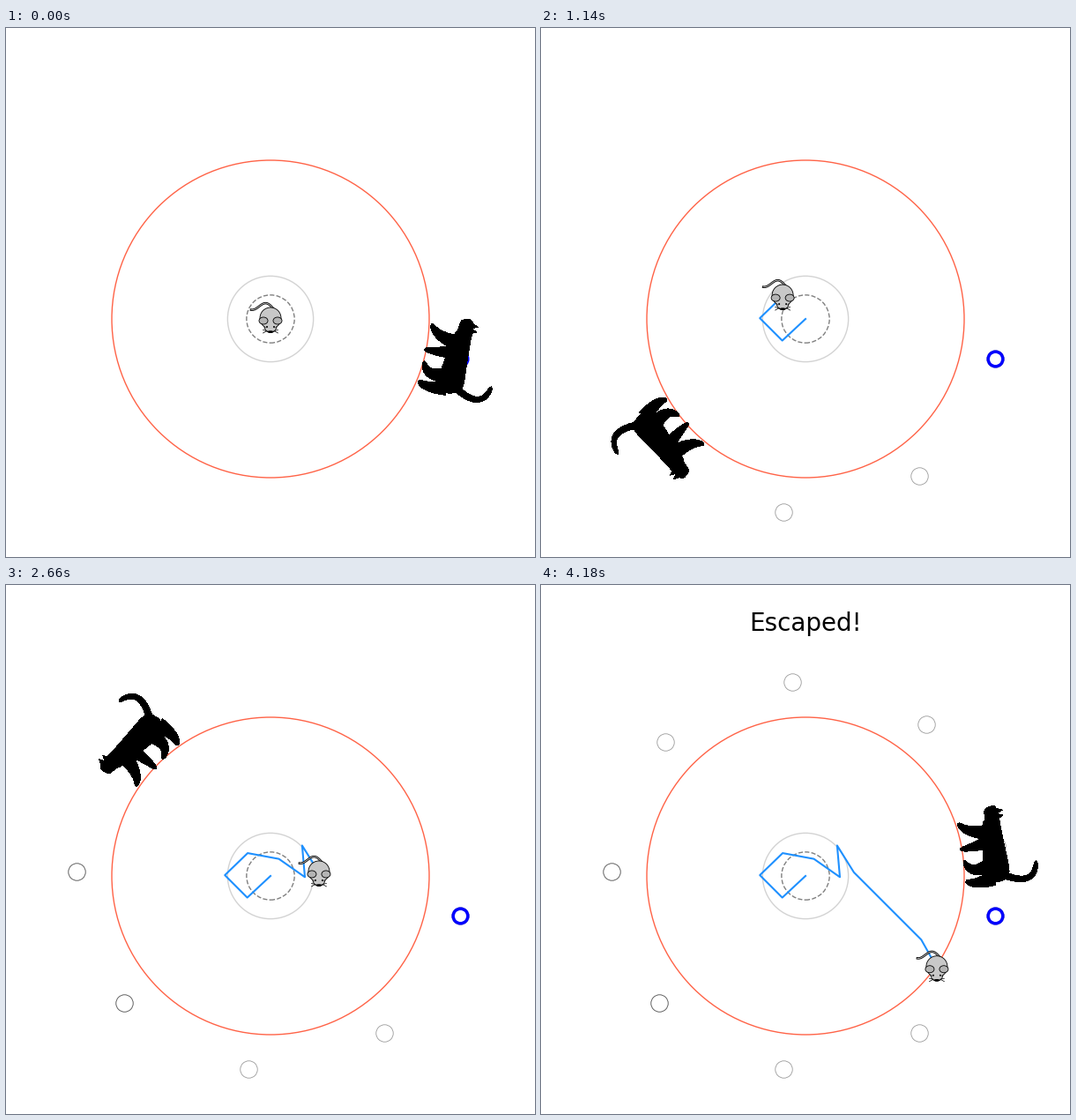
Write a matplotlib script that moves like this. It is 600 px wide and 600 px high and loops after 6080 ms.

```python
import numpy as np
import matplotlib.pyplot as plt
from matplotlib.animation import FuncAnimation
from matplotlib.patches import Circle, Ellipse, Polygon
from matplotlib.transforms import Affine2D

POND = 180
SPEED_RATIO = 3.7
MOUSE_STEP = 36
CAT_STEP = MOUSE_STEP * SPEED_RATIO / POND
CAT_RADIUS = 220
CAT_START = -0.206
HEADINGS = [223, 135, 44, 349.5, 325, 95, 302, 315, 315, 315, 299.3]
STEP_MS = 380
HOLD = 4


def polar(radius, angle):
    return np.transpose([radius * np.cos(angle), radius * np.sin(angle)])


def chase(mouse_path):
    """The cat runs the shorter way round towards the mouse until it escapes."""
    angles = [CAT_START]
    for x, y in mouse_path[1:]:
        gap = (np.arctan2(y, x) - angles[-1] + np.pi) % (2 * np.pi) - np.pi
        escaped = np.hypot(x, y) > POND
        angles.append(angles[-1] + (0 if escaped else CAT_STEP * np.sign(gap)))
    return np.array(angles)


steps = polar(MOUSE_STEP, np.radians(HEADINGS))
mouse_path = np.vstack([(0, 0), np.cumsum(steps, axis=0)])
cat_angles = chase(mouse_path)
cat_spots = polar(CAT_RADIUS, cat_angles)
LAST = len(HEADINGS)

fig = plt.figure(figsize=(6, 6), dpi=100, facecolor="white")
ax = fig.add_axes([0, 0, 1, 1])
ax.set(xlim=(-300, 300), ylim=(-270, 330))
ax.axis("off")
cat_pose, mouse_pose = Affine2D(), Affine2D()


def ring(radius, color, style="-"):
    ax.add_patch(Circle((0, 0), radius, fill=False, ec=color, lw=1, ls=style))


def taper(start, bend, end, w0, w1):
    """Outline of a curved limb, half width w0 to w1, with a rounded end."""
    t = np.linspace(0, 1, 40)[:, None]
    p0, p1, p2 = map(np.array, (start, bend, end))
    mid = (1 - t)**2 * p0 + 2 * t * (1 - t) * p1 + t**2 * p2
    slope = (1 - t) * (p1 - p0) + t * (p2 - p1)
    normal = slope[:, ::-1] * (-1, 1) / np.linalg.norm(slope, axis=1)[:, None]
    side = normal * (w0 + (w1 - w0) * t) * np.sqrt(1 - t**14)
    return np.vstack([mid + side, (mid - side)[::-1]])


def build_cat():
    """Facing left, feet down; the pose turns the feet to the pond."""
    limbs = [
        taper((-28, -2), (0, -5), (41, -5), 9, 16),         # body
        taper((-24, -2), (-36, 0), (-45, -2), 9, 6.5),      # head
        taper((35, 4), (53, 36), (24, 41), 3.6, 2.4),       # tail
        taper((-17, -10), (-20, -34), (-32, -39.5), 8, 2),  # legs
        taper((-5, -12), (-2, -28), (-2, -42), 7, 2),
        taper((22, -14), (28, -36), (11, -39.5), 8, 2),
        taper((36, -10), (41, -34), (34, -41), 8, 2.2)]
    ears = [[(x - 4, 3), (x, 12), (x + 4, 3)] for x in (-39, -33)]
    for shape in limbs + ears:
        ax.add_patch(Polygon(shape, fc="black", lw=0, antialiased=False,
                             zorder=4, transform=cat_pose + ax.transData))


def mouse_line(x, y, color="black", lw=0.6):
    ax.plot(x, y, color=color, lw=lw, zorder=5,
            transform=mouse_pose + ax.transData)


def mouse_oval(x, y, w, h, color="#c8c8c8", lw=0.6):
    ax.add_patch(Ellipse((x, y), w, h, fc=color, ec="black", lw=lw, zorder=5,
                         transform=mouse_pose + ax.transData))


def build_mouse():
    u = np.linspace(0, 1, 30)
    tail = 3 - 25 * u, 12 + 5.5 * np.sin(1.5 * np.pi * u) * (1 - u / 4) + 2.5 * u
    mouse_line(*tail, lw=1.8)
    mouse_line(*tail, "#c8c8c8", 0.6)
    mouse_oval(0, -8, 14, 15)
    mouse_oval(0, 1, 24, 24)
    mouse_oval(0, -6, 13, 14, lw=0)
    mouse_oval(0, -14.5, 7, 2.5, "black", 0)
    for side in (-1, 1):
        mouse_oval(side * 8, -2, 10, 8, "#b4b4b4")
        mouse_oval(side * 4, -9, 2, 2, "black", 0)
        for drop in (-12.5, -16):
            mouse_line([side * 4, side * 8.5], [-13.5, drop], lw=0.5)


ring(POND, "tomato")
ring(POND / SPEED_RATIO, "lightgray")
ring(POND * (1 - np.pi / SPEED_RATIO), "gray", "--")
visited, = ax.plot([], [], "o", ms=14, mfc="none", mec="black", mew=0.6,
                   alpha=0.4, zorder=2)
ax.plot(*cat_spots[:1].T, "o", ms=12, mfc="none", mec="blue", mew=2.5, zorder=3)
trail, = ax.plot([], [], color="dodgerblue", lw=1.5, zorder=3)
title = ax.text(0, 278.5, "Escaped!", fontsize=20, ha="center",
                va="baseline", family="DejaVu Sans")
build_cat()
build_mouse()


def update(frame):
    step = min(frame, LAST)
    trail.set_data(*mouse_path[:step + 1].T)
    visited.set_data(*cat_spots[:step].T)
    mouse_pose.clear().translate(*mouse_path[step])
    cat_pose.clear().translate(0, CAT_RADIUS).rotate(cat_angles[step] - np.pi / 2)
    title.set_visible(step == LAST)
    return trail, visited, title


anim = FuncAnimation(fig, update, frames=LAST + 1 + HOLD, interval=STEP_MS,
                     repeat=True, repeat_delay=0, blit=False)
plt.show()
```
